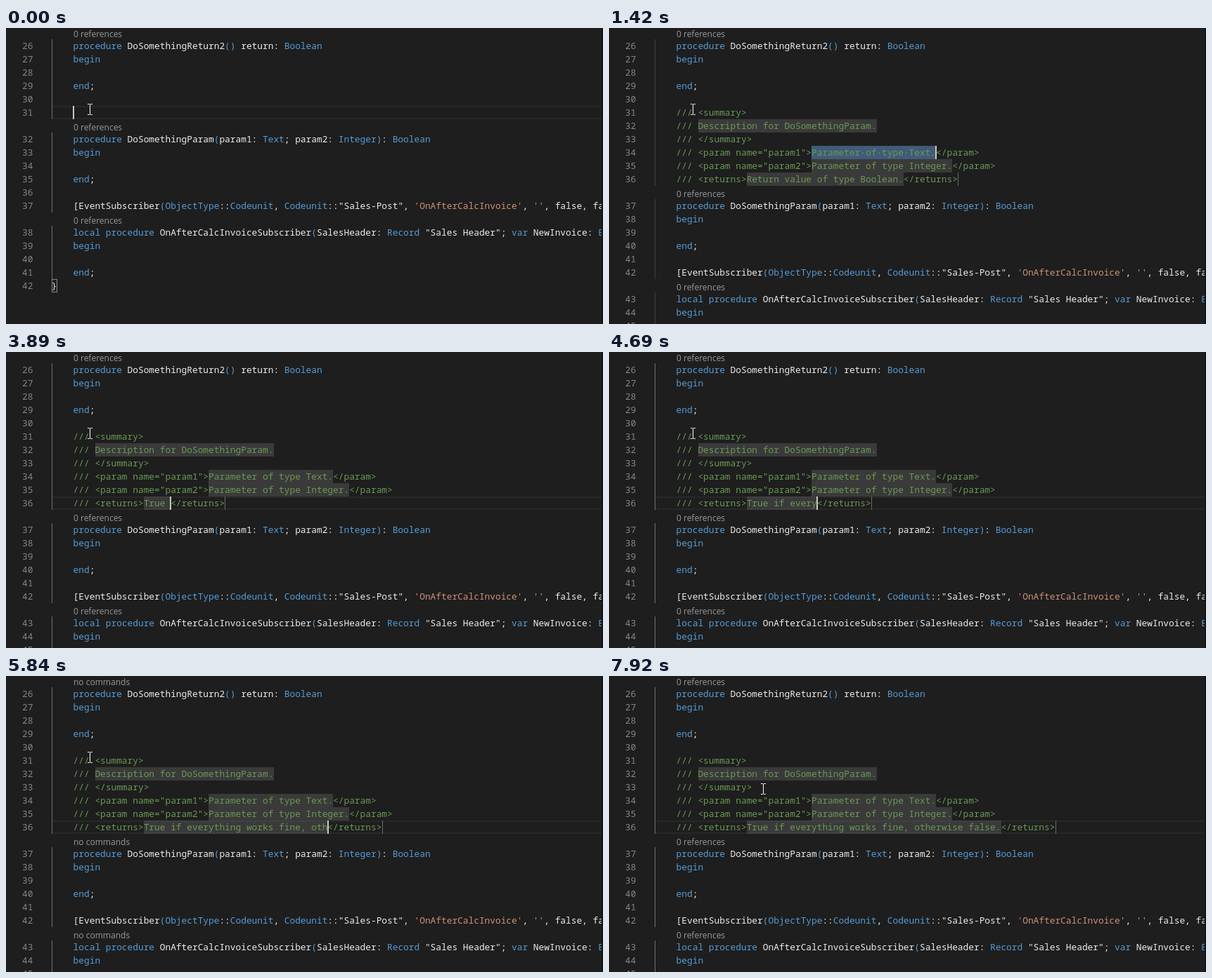
Recreate the animation shown at these times as an HTML page with a canvas. Size 849 by 422 pixels, loop 8 s.

```html
<!DOCTYPE html>
<html lang="en">
<head>
<meta charset="utf-8">
<title>Doc comment snippet</title>
<style>
  html, body { margin: 0; width: 100%; height: 100%; overflow: hidden; background: #1e1e1e; }
  canvas { display: block; }
</style>
</head>
<body>
<canvas id="stage" width="849" height="422"></canvas>
<script>
const ctx = document.getElementById('stage').getContext('2d', { alpha: false });
const LOOP = 8000, LINE = 19, CHAR = 7.697, LEFT = 96.3, TOP = -3;
const BEARING = -0.7;
const CODE_FONT = '12.83px "Noto Sans Mono", "DejaVu Sans Mono", monospace';
const LENS_FONT = '12px "Open Sans", "Noto Sans", sans-serif';
const C = {
  bg: '#1e1e1e', text: '#ececec', key: '#569cd6', str: '#ce9178', comment: '#6a9955',
  num: '#858585', lens: '#999999', guide: '#404040', guideOn: '#707070', current: '#282828',
  select: '#264f78', field: 'rgba(124,124,124,0.3)', stop: '#6a6a6a',
  caret: '#c8c8bc', dot: 'rgba(227,228,226,0.35)', edge: '#131313'
};

const LENS = 'lens';
const before = [LENS, 'procedure DoSomethingReturn2() return: Boolean', 'begin', '', 'end;', ''];
const after = [
  LENS, 'procedure DoSomethingParam(param1: Text; param2: Integer): Boolean',
  'begin', '', 'end;', '',
  `[EventSubscriber(ObjectType::Codeunit, Codeunit::"Sales-Post", 'OnAfterCalcInvoice', '', false, false)]`,
  LENS, 'local procedure OnAfterCalcInvoiceSubscriber(SalesHeader: Record "Sales Header"; var NewInvoice: Boolean)',
  'begin', '', 'end;', '}'
];
const RETURNS = 'Return value of type Boolean.';
const TYPED = 'True if everything works fine, otherwise false.';

// [first key, last key, length before, length after]
const bursts = [
  [3460, 3510, 0, 2], [3690, 4190, 2, 8], [4350, 4490, 8, 12], [4670, 4670, 12, 13],
  [4750, 5210, 13, 24], [5350, 6120, 24, 40], [6180, 6410, 40, 47]
];
const caretOff = [
  [50, 330], [660, 800], [1720, 1910], [2540, 2760], [3020, 3200],
  [6650, 6900], [7130, 7530], [7780, LOOP]
];
const lensStale = [[4030, 4690], [5800, 6610]];

const within = (spans, t) => spans.some(([a, b]) => t >= a && t < b);
const colX = col => LEFT + col * CHAR;
const rowY = row => TOP + row * LINE;

function rect(x, y, w, h, color) {
  ctx.fillStyle = color;
  ctx.fillRect(x, y, w, h);
}

// Monospace text laid out on the editor's character grid.
function grid(str, x, y, color) {
  ctx.font = CODE_FONT;
  ctx.fillStyle = color;
  [...str].forEach((ch, i) => {
    if (ch !== ' ') ctx.fillText(ch, x + BEARING + i * CHAR, y + 14);
  });
}

const token = /'[^']*'|"[^"]*"|\b(?:local|procedure|begin|end|var|Boolean|Text|Integer|Record|ObjectType|Codeunit)\b|[()]/g;

function code(str, y) {
  if (str[0] === '/') return grid(str, LEFT, y, C.comment);
  if (str === '}') {
    rect(65, y, 8, LINE, '#888888');
    rect(66, y + 1, 6, LINE - 2, '#1b251b');
    return grid(str, colX(-4), y, C.text);
  }
  let last = 0;
  for (const m of str.matchAll(token)) {
    grid(str.slice(last, m.index), colX(last), y, C.text);
    const color = m[0][0] === "'" ? C.str : m[0][0] === '"' ? C.text : C.key;
    grid(m[0], colX(m.index), y, color);
    last = m.index + m[0].length;
  }
  grid(str.slice(last), colX(last), y, C.text);
}

function typedLength(t) {
  let n = 0;
  for (const [a, b, from, to] of bursts) {
    if (t < a) break;
    const gap = (b - a) / Math.max(1, to - from - 1);
    n = gap ? Math.min(to, from + 1 + Math.floor((t - a) / gap + 1e-6)) : to;
  }
  return n;
}

// Comment lines, snippet fields, caret and selection at time t.
function editorState(t) {
  if (t < 1190) {
    const n = t < 800 ? 0 : t < 900 ? 1 : t < 1100 ? 2 : 3;
    return { lines: ['/'.repeat(n)], fields: [], caret: { row: 6, col: n }, selected: null };
  }
  const value = t < 3200 ? RETURNS : TYPED.slice(0, typedLength(t));
  const lines = [
    '/// <summary>',
    '/// Description for DoSomethingParam.',
    '/// </summary>',
    '/// <param name="param1">Parameter of type Text.</param>',
    '/// <param name="param2">Parameter of type Integer.</param>',
    `/// <returns>${value}</returns>`
  ];
  const fields = [[7, 4, 33], [9, 25, 23], [10, 25, 26], [11, 13, value.length]]
    .map(([row, col, len]) => ({ row, col, len }));
  const active = fields[t < 1420 ? 0 : t < 1910 ? 1 : t < 2240 ? 2 : 3];
  return {
    lines, fields,
    caret: { row: active.row, col: active.col + active.len },
    selected: t < 3200 ? active : null
  };
}

function drawGuide(rows, color) {
  rows.forEach((row, i) => {
    if (row !== LENS && row !== '}') rect(65, rowY(i), 1, LINE, color);
  });
}

function drawMouse(t) {
  const ramp = (a, b) => Math.min(1, Math.max(0, (t - a) / (b - a)));
  const p = ramp(7060, 7390), q = ramp(7690, 7920);
  const x = 119 + Math.round(93 * p + 7 * q);
  const y = 108 + Math.round(40 * p + 5 * q);
  for (const end of [y, y + 15]) {
    rect(x - 3, end, 3, 1, '#ffffff');
    rect(x + 1, end, 3, 1, '#ffffff');
  }
  rect(x, y + 1, 1, 14, '#ffffff');
}

function draw(t) {
  const { lines, fields, caret, selected } = editorState(t);
  const rows = [...before, ...lines, ...after];
  rect(0, 0, 849, 422, C.bg);

  if (!selected) {
    const y = rowY(caret.row);
    rect(65, y, 784, 2, C.current);
    rect(65, y + LINE - 2, 784, 2, C.current);
  }
  drawGuide(rows, selected ? C.guide : C.guideOn);

  const span = (f, color) => {
    const x = Math.floor(colX(f.col));
    rect(x, rowY(f.row), Math.floor(colX(f.col + f.len)) - x, LINE, color);
  };
  if (selected) span(selected, C.select);
  fields.forEach(f => span(f, C.field));
  if (fields.length) rect(Math.floor(colX(lines[5].length)), rowY(11), 1, LINE, C.stop);

  let number = 26;
  rows.forEach((row, i) => {
    const y = rowY(i);
    if (y > 422) return;
    if (row === LENS) {
      ctx.font = LENS_FONT;
      ctx.fillStyle = C.lens;
      ctx.fillText(within(lensStale, t) ? 'no commands' : '0 references', 96, y + 16);
    } else {
      grid(String(number++), 23.7, y, C.num);
      code(row, y);
    }
  });

  if (selected) {
    const { row, col, len } = selected;
    const dots = rows[row].slice(col, col + len).replace(/\S/g, '_').replace(/ /g, '·').replace(/_/g, ' ');
    grid(dots, colX(col), rowY(row), C.dot);
  }
  if (!within(caretOff, t)) {
    rect(Math.floor(colX(caret.col) - 1), rowY(caret.row), 2, LINE, C.caret);
  }
  rect(847, 0, 2, 422, C.edge);
  drawMouse(t);
}

const start = performance.now();
function tick() {
  draw((performance.now() - start) % LOOP);
  requestAnimationFrame(tick);
}
tick();
</script>
</body>
</html>
```
